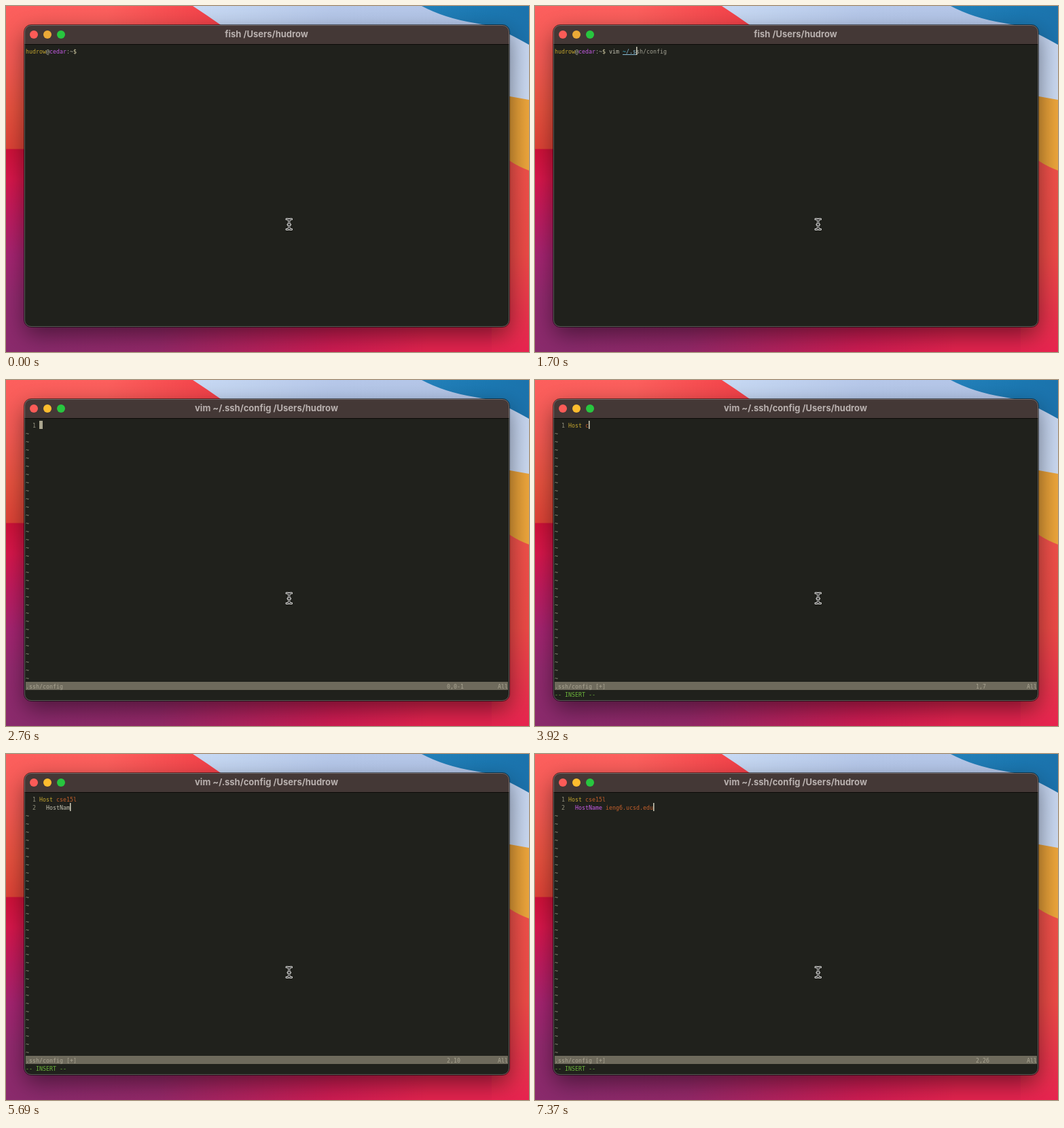
An HTML page with a canvas for the animation above (8000 ms loop, 770 by 509 pixels).

```html
<!DOCTYPE html>
<html lang="en">
<head>
<meta charset="utf-8">
<title>Editing an ssh config</title>
<style>
  html, body { margin: 0; width: 770px; height: 509px; overflow: hidden; background: #8a2a6c; }
  canvas { display: block; }
</style>
</head>
<body>
<canvas id="stage" width="770" height="509"></canvas>
<script>
const W = 770, H = 509, LOOP = 8000;
const USER = 'hudrow', HOST = 'cedar';
const CELL = 5, ROW = 12, LEFT = 29, TOP = 60;
const MONO = '8.3px "DejaVu Sans Mono", monospace';
const SANS = 'bold 13px Inter, sans-serif';

const COLOR = {
  body: '#20211c', bar: '#443836', plain: '#c3c2b2', dim: '#a3a294',
  yellow: '#c4a62f', purple: '#c65be6', orange: '#c4602c', green: '#6cb53c',
  cyan: '#38acc9', path: '#86b9d3', gutter: '#94937f', status: '#6e6a5c',
  statusText: '#aaa592', cursor: '#aaa68f', caret: '#d0cebb'
};

// Each step is [time, characters typed so far].
const COMMAND = 'vim ~/.ssh/config';
const commandSteps = [
  [720, 1], [800, 2], [890, 4], [1070, 5], [1160, 6], [1250, 7], [1700, 8],
  [1880, 9], [1970, 10], [2150, 11], [2320, 12], [2410, 14], [2490, 17]
];
const LINE1 = 'Host cse15l';
const line1Steps = [
  [3570, 1], [3660, 2], [3740, 3], [3830, 5], [3920, 6], [4000, 7], [4090, 8],
  [4270, 9], [4360, 10], [4440, 11]
];
const LINE2 = '  HostName ieng6.ucsd.edu';
const line2Steps = [
  [4620, 2], [5250, 3], [5330, 5], [5420, 6], [5600, 8], [5690, 9], [5860, 11],
  [6130, 13], [6310, 15], [6580, 16], [6660, 17], [6840, 18], [6930, 19],
  [7010, 20], [7100, 21], [7190, 23], [7370, 25]
];
const ENTER = 2580, VIM_TITLE = 2670, VIM_OPEN = 2760, INSERT = 3300, SECOND_LINE = 4620;

const ctx = document.getElementById('stage').getContext('2d');

function typed(steps, t) {
  let n = 0;
  for (const [at, count] of steps) if (t >= at) n = count;
  return n;
}

function gradient(c, x0, y0, x1, y1, stops) {
  const g = c.createLinearGradient(x0, y0, x1, y1);
  stops.forEach(([at, color]) => g.addColorStop(at, color));
  return g;
}

function shape(c, path, fill) {
  c.fillStyle = fill;
  c.fill(new Path2D(path));
}

function disc(c, x, y, r, fill) {
  c.fillStyle = fill;
  c.beginPath();
  c.arc(x, y, r, 0, Math.PI * 2);
  c.fill();
}

function paintWallpaper(c) {
  c.fillStyle = gradient(c, 0, 0, 0, H, [
    [0, '#fd5f5d'], [0.15, '#f65b55'], [0.3, '#e9523f'], [0.413, '#df4336'],
    [0.414, '#d01139'], [0.5, '#d9164b'], [0.6, '#c21b5e'], [0.72, '#a72472'],
    [0.84, '#942a70'], [1, '#8a2a6c']
  ]);
  c.fillRect(0, 0, W, H);
  c.fillStyle = gradient(c, 60, 440, 620, 509, [
    [0, 'rgba(216,25,78,0)'], [0.3, 'rgba(216,25,78,.12)'],
    [0.75, 'rgba(218,25,78,.85)'], [1, '#e3234e']
  ]);
  c.fillRect(0, 300, W, 209);
  c.fillStyle = gradient(c, 150, 0, 310, 28, [
    [0, 'rgba(243,64,72,0)'], [1, '#f34048']
  ]);
  c.fillRect(150, 0, 200, 28);

  c.fillStyle = gradient(c, 0, 220, 0, H, [
    [0, '#f0514a'], [0.5, '#ec4a46'], [0.75, '#e8384a'], [1, '#e7234f']
  ]);
  c.fillRect(715, 220, 55, 289);
  shape(c, 'M700 120H770V242Q754 236 742 228L700 200Z',
    gradient(c, 742, 0, 770, 0, [[0, '#e09a35'], [1, '#eda63c']]));
  shape(c, 'M275 0H770V138L742 133L700 128V60H360Q315 26 275 0Z',
    gradient(c, 275, 0, 770, 130, [
      [0, '#c8daf4'], [0.4, '#b6c8ea'], [0.8, '#b4c6e8'], [1, '#cbd9f0']
    ]));
  shape(c, 'M612 0H770V57Q754 48 742 42Q718 29 690 25Q646 18 612 0Z',
    gradient(c, 612, 0, 770, 40, [[0, '#2380ba'], [0.6, '#1b78b2'], [1, '#1b72ac']]));
}

function paintWindow(c) {
  const frame = new Path2D();
  frame.roundRect(27, 28, 714, 444, 10);
  c.save();
  c.shadowColor = 'rgba(0,0,0,.48)';
  c.shadowBlur = 34;
  c.shadowOffsetY = 12;
  c.fillStyle = COLOR.body;
  c.fill(frame);
  c.restore();

  c.save();
  c.clip(frame);
  c.fillStyle = COLOR.bar;
  c.fillRect(27, 28, 714, 28);
  c.fillStyle = '#0c0b09';
  c.fillRect(27, 56, 714, 1);
  c.restore();

  c.lineWidth = 1;
  c.strokeStyle = 'rgba(0,0,0,.55)';
  c.beginPath();
  c.roundRect(26.5, 27.5, 715, 445, 10.5);
  c.stroke();
  c.strokeStyle = 'rgba(255,255,255,.25)';
  c.beginPath();
  c.roundRect(27.5, 28.5, 713, 443, 9.5);
  c.stroke();

  disc(c, 41, 42, 6, '#fc5b57');
  disc(c, 81, 42, 6, '#28c63f');
}

function makeBackdrop() {
  const layer = document.createElement('canvas');
  layer.width = W;
  layer.height = H;
  const c = layer.getContext('2d');
  paintWallpaper(c);
  paintWindow(c);
  return layer;
}

const cellX = col => LEFT + col * CELL;
const rowY = row => TOP + row * ROW;

// Writes on the terminal grid and returns the next column.
function put(text, col, row, color) {
  ctx.font = MONO;
  ctx.textAlign = 'left';
  ctx.fillStyle = color;
  [...text].forEach((ch, i) => ctx.fillText(ch, cellX(col + i), rowY(row) + 10));
  return col + text.length;
}

function fillCells(col, row, width, color) {
  ctx.fillStyle = color;
  ctx.fillRect(cellX(col), rowY(row), width, ROW);
}

const block = (col, row) => fillCells(col, row, CELL, COLOR.cursor);
const caret = (col, row) => fillCells(col, row, 1.5, COLOR.caret);

function drawTitle(t) {
  const app = t < VIM_TITLE ? 'fish' : 'vim ~/.ssh/config';
  disc(ctx, 61, 42, 6, t < VIM_TITLE ? '#eaa937' : '#fdbc2e');
  ctx.font = SANS;
  ctx.textAlign = 'center';
  ctx.fillStyle = '#b9b1af';
  ctx.fillText(`${app} /Users/${USER}`, 383.5, 46);
}

function drawShell(t) {
  let col = put(USER, 0, 0, COLOR.yellow);
  col = put('@', col, 0, COLOR.plain);
  col = put(HOST, col, 0, COLOR.purple);
  col = put(':', col, 0, COLOR.dim);
  col = put('~', col, 0, COLOR.dim);
  col = put('$', col, 0, '#d8d2a8') + 1;

  const n = typed(commandSteps, t);
  if (n) {
    [...COMMAND].forEach((ch, i) => {
      const color = i >= n ? COLOR.dim : i < 4 ? COLOR.plain : i === 4 ? COLOR.cyan : COLOR.path;
      put(ch, col + i, 0, color);
    });
  }
  if (n > 4) {
    ctx.fillStyle = COLOR.path;
    ctx.fillRect(cellX(col + 4), 71, (n - 4) * CELL, 1);
  }
  if (t >= ENTER) block(0, 1);
  else if (t >= 450) caret(col + n, 0);
}

function drawSetting(text, indent, keyword, row, color) {
  const end = indent + keyword.length;
  const word = text.slice(indent, end);
  const known = word === keyword ? color : word === 'Host' ? COLOR.yellow : COLOR.plain;
  put(word, 4 + indent, row, known);
  put(text.slice(end), 4 + end, row, COLOR.orange);
}

function drawVim(t) {
  const second = t >= SECOND_LINE;
  const inserting = t >= INSERT;
  const n1 = typed(line1Steps, t);
  const n2 = typed(line2Steps, t);

  put('1', 2, 0, COLOR.gutter);
  if (second) put('2', 2, 1, COLOR.gutter);
  for (let row = second ? 2 : 1; row < 32; row++) put('~', 0, row, COLOR.gutter);

  drawSetting(LINE1.slice(0, n1), 0, 'Host', 0, COLOR.yellow);
  if (second) drawSetting(LINE2.slice(0, n2), 2, 'HostName', 1, COLOR.purple);

  const n = second ? n2 : n1;
  if (inserting) caret(4 + n, second ? 1 : 0);
  else block(4, 0);

  fillCells(0, 32, 142 * CELL, COLOR.status);
  put('.ssh/config' + (n1 ? ' [+]' : ''), 0, 32, COLOR.statusText);
  const line = second ? 2 : n1 ? 1 : 0;
  put(inserting ? `${line},${n + 1}` : '0,0-1', 124, 32, COLOR.statusText);
  put('All', 139, 32, COLOR.statusText);
  if (inserting) put('-- INSERT --', 0, 33, COLOR.green);
}

const beam = new Path2D(
  'M413 313.5H414.5Q416.8 313.5 416.8 316V326Q416.8 328.5 414.5 328.5H413' +
  'M420.5 313.5H419Q416.8 313.5 416.8 316M420.5 328.5H419Q416.8 328.5 416.8 326' +
  'M415 321.5H418.5'
);

function drawPointer() {
  ctx.lineCap = 'round';
  ctx.lineWidth = 3;
  ctx.strokeStyle = '#f2f2f0';
  ctx.stroke(beam);
  ctx.lineWidth = 1.1;
  ctx.strokeStyle = '#0a0a0a';
  ctx.stroke(beam);
}

const backdrop = makeBackdrop();
const start = performance.now();

function render() {
  const t = (performance.now() - start) % LOOP;
  ctx.drawImage(backdrop, 0, 0);
  drawTitle(t);
  if (t < VIM_OPEN) drawShell(t);
  else drawVim(t);
  drawPointer();
  requestAnimationFrame(render);
}
render();
</script>
</body>
</html>
```
